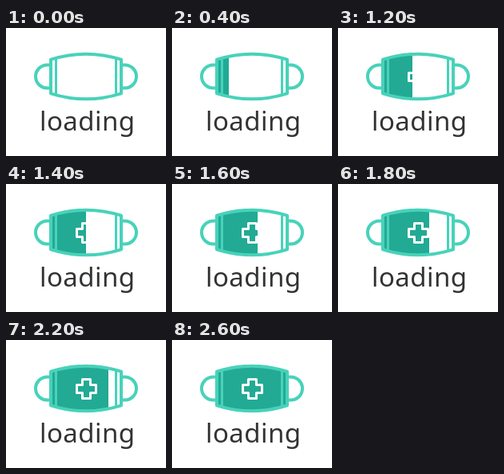
An HTML page for the animation above (2800 ms loop, 200x161 px).

```html
<!DOCTYPE html>
<html lang="en">
<head>
<meta charset="utf-8">
<title>Loading</title>
<style>
  html, body { margin: 0; width: 100%; height: 100%; overflow: hidden; background: #fff; }
  svg { display: block; width: 100vw; height: 100vh; }
  .line { fill: none; stroke: #48d2ba; stroke-width: 4; }
  .cross { fill: none; stroke: #fff; stroke-width: 3; stroke-linejoin: round; }
  text { font: 300 33px "Noto Sans", "Open Sans", sans-serif; letter-spacing: .4px; fill: #333; }
</style>
</head>
<body>
<svg viewBox="0 0 200 161">
  <defs>
    <path id="body" d="M56 39.7Q100 25.7 144 39.7V82.3Q100 96.3 56 82.3Z"/>
    <clipPath id="level"><rect id="bar" x="56" y="28" width="0" height="66"/></clipPath>
  </defs>
  <g clip-path="url(#level)">
    <use href="#body" fill="#22aa95"/>
    <path class="cross" d="M95.5 49.5h10v7h7v10h-7v7h-10v-7h-7v-10h7z"/>
  </g>
  <path class="line" d="M56 46.5H51.5A14.5 14.5 0 0 0 51.5 75.5H56M144 46.5H148.5A14.5 14.5 0 0 1 148.5 75.5H144"/>
  <use href="#body" class="line" stroke-linejoin="round"/>
  <path class="line" style="stroke-width:3" d="M62.5 38V84M137.5 38V84"/>
  <text x="42.1" y="129.3">loading</text>
</svg>
<script>
  const STEP = 200;
  // right edge of the filled part at each step
  const edges = [56, 61, 71, 74, 81, 86];
  for (let x = 93; x <= 142; x += 7) edges.push(x);

  const bar = document.getElementById("bar");

  function draw(ms) {
    const i = Math.floor(ms / STEP) % edges.length;
    bar.setAttribute("width", edges[i] - 56);
  }

  const start = performance.now();
  function tick() {
    draw(performance.now() - start);
    requestAnimationFrame(tick);
  }
  draw(0);
  requestAnimationFrame(tick);
</script>
</body>
</html>
```
